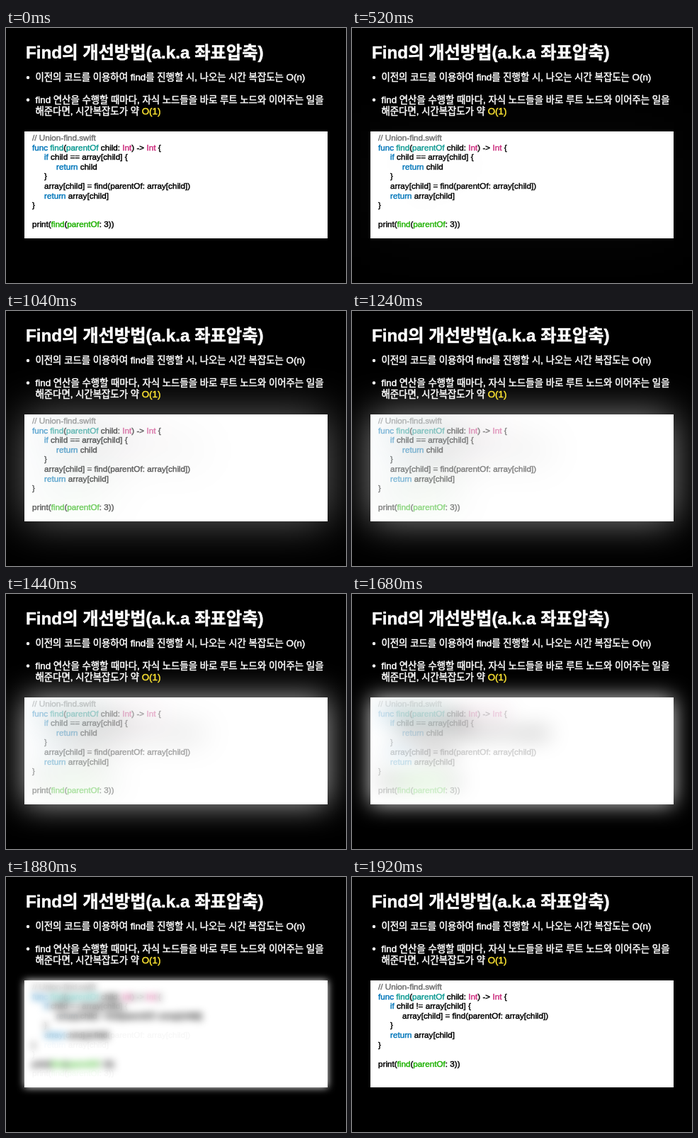
Write an HTML page with a canvas that moves like this. It is 480 px wide and 360 px high and loops after 2440 ms.

```html
<!DOCTYPE html>
<html lang="ko">
<head>
<meta charset="utf-8">
<title>Find</title>
<style>
html, body { margin: 0; width: 100%; height: 100%; overflow: hidden; background: #000; }
canvas { display: block; width: 480px; height: 360px; }
</style>
</head>
<body>
<canvas id="stage" width="480" height="360"></canvas>
<script>
const W = 480, H = 360, LOOP = 2440, STEP = 40, START = 520, END = 1920;
const BOX = [26, 146, 428, 151];
const FAMILY = '"Liberation Sans", "Noto Sans CJK KR", "Noto Sans CJK", sans-serif';
const BLUE = '#0076ba', TEAL = '#0e9b93', GREEN = '#1db100', PINK = '#cb297b',
      GRAY = '#707070', BLACK = '#000', WHITE = '#fff', YELLOW = '#fae232';

const ctx = document.getElementById('stage').getContext('2d');

function layer(paint) {
  const c = document.createElement('canvas');
  c.width = W;
  c.height = H;
  paint(c.getContext('2d'));
  return c;
}

// Runs alternate text and colour; a thin stroke adds weight.
function write(g, x, y, size, weight, runs, stroke) {
  g.font = `${weight} ${size}px ${FAMILY}`;
  g.lineWidth = stroke;
  g.lineJoin = 'round';
  for (let i = 0; i < runs.length; i += 2) {
    const text = runs[i];
    g.fillStyle = g.strokeStyle = runs[i + 1];
    g.fillText(text, x, y);
    g.strokeText(text, x, y);
    x += g.measureText(text).width;
  }
}

const slide = layer(g => {
  write(g, 28, 43, 24.25, 700, ['Find의 개선방법(a.k.a 좌표압축)', WHITE], 0.5);
  const body = (y, ...runs) => write(g, 41.5, y, 13.38, 500, runs, 0.5);
  body(74, '이전의 코드를 이용하여 find를 진행할 시, 나오는 시간 복잡도는 O(n)', WHITE);
  body(105.5, 'find 연산을 수행할 때마다, 자식 노드들을 바로 루트 노드와 이어주는 일을', WHITE);
  body(122, '해준다면, 시간복잡도가 약 ', WHITE, 'O(1)', YELLOW);
  g.fillStyle = WHITE;
  for (const y of [70, 101.5]) {
    g.beginPath();
    g.arc(31, y, 2.2, 0, Math.PI * 2);
    g.fill();
  }
});

// Each line: indent level, then runs.
const codeLayer = lines => layer(g => lines.forEach(([indent, ...runs], i) =>
  write(g, 37 + indent * 17, 159 + i * 13.6, 11.7, 500, runs, 0.45)));

const head = [
  [0, '// Union-find.swift', GRAY],
  [0, 'func ', BLUE, 'find', TEAL, '(', BLACK, 'parentOf', TEAL, ' child: ', BLACK,
    'Int', PINK, ') -> ', BLACK, 'Int', PINK, ' {', BLACK]
];
const tail = [
  [1, 'return', BLUE, ' array[child]', BLACK],
  [0, '}', BLACK],
  [0],
  [0, 'print(', BLACK, 'find', GREEN, '(', BLACK, 'parentOf', GREEN, ': 3))', BLACK]
];
const assign = 'array[child] = find(parentOf: array[child])';

const before = codeLayer([
  ...head,
  [1, 'if', BLUE, ' child == array[child] {', BLACK],
  [2, 'return', BLUE, ' child', BLACK],
  [1, '}', BLACK],
  [1, assign, BLACK],
  ...tail
]);
const after = codeLayer([
  ...head,
  [1, 'if', BLUE, ' child != array[child] {', BLACK],
  [2, assign, BLACK],
  [1, '}', BLACK],
  ...tail
]);

function fillBox() {
  ctx.fillStyle = WHITE;
  ctx.fillRect(...BOX);
}

function draw(p) {
  const moving = p > 0 && p < 1;
  const blur = 40 * Math.pow(1 - p, 0.55);

  ctx.fillStyle = BLACK;
  ctx.fillRect(0, 0, W, H);

  if (moving) {
    ctx.save();
    ctx.globalAlpha = p;
    ctx.filter = `blur(${blur}px)`;
    fillBox();
    ctx.restore();
  }
  fillBox();

  ctx.save();
  ctx.beginPath();
  ctx.rect(...BOX);
  ctx.clip();
  ctx.globalAlpha = 1 - p;
  ctx.drawImage(before, 0, 0);
  ctx.globalAlpha = p;
  if (moving) ctx.filter = `blur(${blur}px)`;
  ctx.drawImage(after, 0, 0);
  ctx.restore();

  ctx.drawImage(slide, 0, 0);
}

function progress(t) {
  if (t < START) return 0;
  if (t >= END) return 1;
  const steps = (END - START) / STEP + 1;
  return (Math.floor((t - START) / STEP) + 1) / steps;
}

const origin = performance.now();
let shown = -1;

function tick() {
  const p = progress((performance.now() - origin) % LOOP);
  if (p !== shown) draw(shown = p);
  requestAnimationFrame(tick);
}
tick();
</script>
</body>
</html>
```
